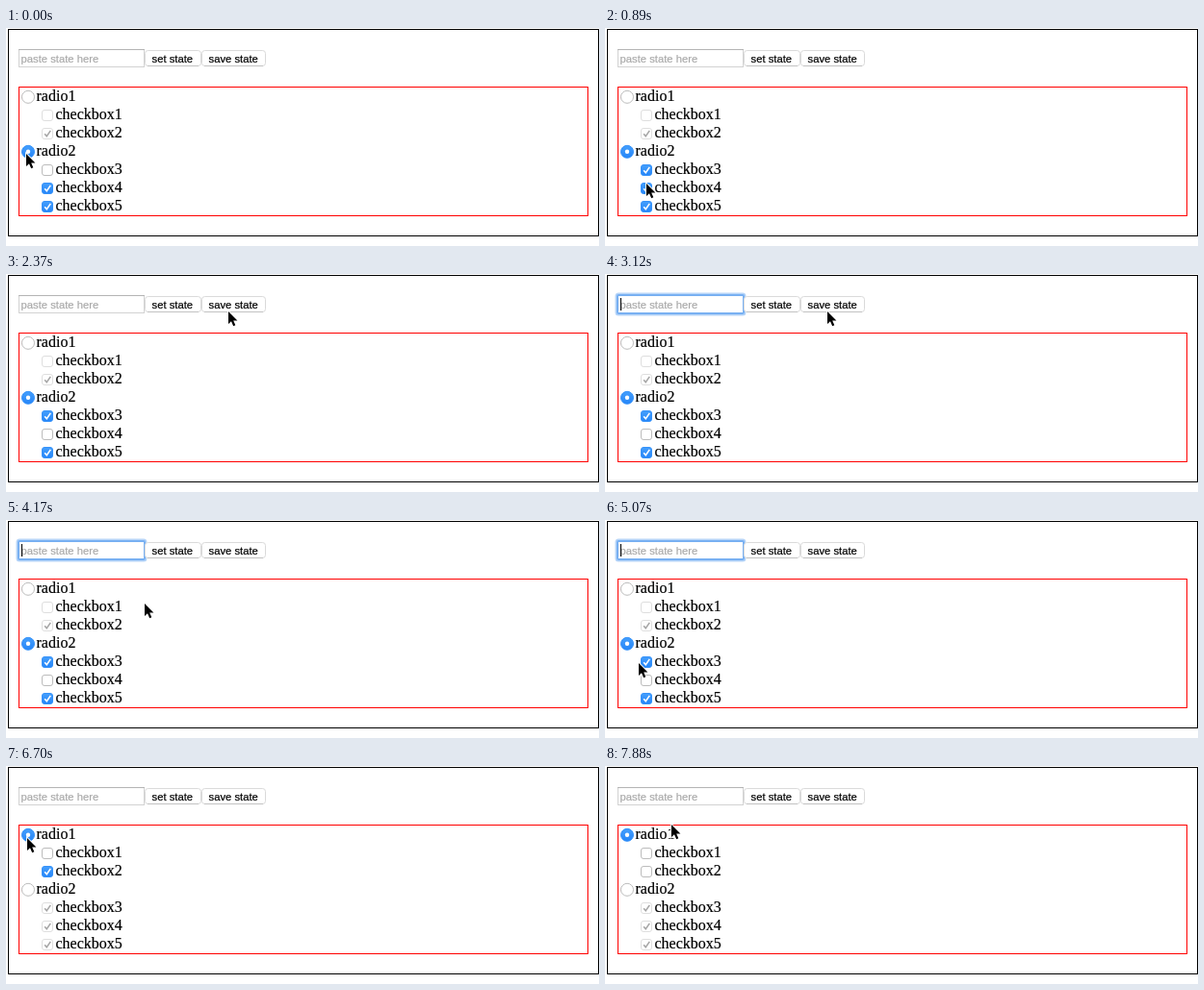
An HTML page for the animation above (8 s loop, 616 px wide and 227 px high).

```html
<!DOCTYPE html>
<html lang="en">
<head>
<meta charset="utf-8">
<title>Form state</title>
<style>
  html, body { margin: 0; width: 100%; height: 100%; overflow: hidden; background: #fff; }
  svg { display: block; width: 616px; height: 227px; }
  text { font: 16px "Liberation Serif", Times, serif; stroke: #000; stroke-width: .2; }
  .ui { font: 11.25px "Liberation Sans", Arial, sans-serif; }
  .hint { fill: #a9a9a9; stroke: #a9a9a9; }

  .button rect { fill: #fff; stroke: #dadada; }
  .button path { stroke: #c2c2c2; }
  .button.on rect { fill: url(#press); stroke: #3d8cf0; }
  .button.on path { stroke: #1d62d6; }
  .button.on text { fill: #fff; stroke: #fff; }

  .box { fill: #fff; stroke: #bcbcbc; }
  .mark { fill: none; stroke: #fff; stroke-width: 1.6; visibility: hidden; }
  .dot { fill: #fff; visibility: hidden; }
  .on .box { fill: url(#blue); stroke: #3592fa; }
  .on .mark, .on .dot { visibility: visible; }
  .disabled .box { fill: #fff; stroke: #dedede; }
  .disabled .mark { stroke: #a6a6a6; }

  #focus, #caret { visibility: hidden; }
  #focus.on, #caret.on { visibility: visible; }
</style>
</head>
<body>
<svg viewBox="0 0 616 227">
  <defs>
    <linearGradient id="blue" x2="0" y2="1">
      <stop stop-color="#459ffc"/><stop offset="1" stop-color="#2585f8"/>
    </linearGradient>
    <linearGradient id="press" x2="0" y2="1">
      <stop stop-color="#6cb3fa"/><stop offset="1" stop-color="#136fff"/>
    </linearGradient>
  </defs>

  <rect x="2.5" y="1.5" width="613" height="215" fill="none" stroke="#000"/>
  <rect x="13.5" y="61.5" width="591" height="134" fill="none" stroke="#f00"/>

  <rect x="13.5" y="22.5" width="130" height="18" fill="#fff" stroke="#d2d2d2"/>
  <path d="M13 22.5H144" stroke="#b4b4b4"/>
  <g id="focus" fill="none">
    <rect x="11.5" y="20.5" width="134" height="22" rx="2.5" stroke="#b5d4f8" stroke-width="2"/>
    <rect x="13" y="22" width="131" height="19" rx="1" stroke="#78b0f2" stroke-width="2"/>
  </g>
  <text class="ui hint" x="15.5" y="36">paste state here</text>
  <path id="caret" d="M16.5 25V38" stroke="#000"/>

  <g id="form"></g>

  <path id="cursor" d="M2 2V15L5 12.3L7.2 17.2L9.3 16.3L7.2 11.6H11.4Z"
        stroke="#fff" stroke-width="1.8" paint-order="stroke"/>
</svg>

<script>
const LOOP = 8000;
const TICK = 148.6; // the picture advances in ticks of this many ms
const $ = id => document.getElementById(id);

const button = (id, x, width, label) => `<g id="${id}" class="button">
  <rect x="${x + .5}" y="23.5" width="${width - 1}" height="16" rx="3"/>
  <path d="M${x + 3} 39.5H${x + width - 3}"/>
  <text class="ui" x="${x + 7.5}" y="36">${label}</text></g>`;

const radio = (id, y) => `<g id="${id}">
  <circle class="box" cx="23" cy="${y - 4.2}" r="6.5"/>
  <circle class="dot" cx="23" cy="${y - 4.2}" r="2.2"/>
  <text x="31.5" y="${y}">${id}</text></g>`;

const checkbox = (id, y) => `<g id="${id}">
  <rect class="box" x="37.5" y="${y - 9.5}" width="11" height="11" rx="2.5"/>
  <path class="mark" d="M40.2 ${y - 3.8}l2.1 2.5 4-5.8"/>
  <text x="51.5" y="${y}">${id}</text></g>`;

const isRadio = id => id.startsWith("radio");
const rows = ["radio1", "checkbox1", "checkbox2", "radio2", "checkbox3", "checkbox4", "checkbox5"];
$("form").innerHTML = button("set", 144, 59, "set state") + button("save", 203, 67, "save state") +
  rows.map((id, i) => (isRadio(id) ? radio : checkbox)(id, 76 + 19 * i)).join("");

const home = { x: 19, y: 129 };
const moves = [
  { from: 0, to: 2, x: 45, y: 151 },
  { from: 5, to: 8, x: 38, y: 167 },
  { from: 11, to: 13, x: 181, y: 118 },
  { from: 13, to: 16, x: 229, y: 37 },
  { from: 23, to: 30, x: 134, y: 89 },
  { from: 30, to: 34, x: 33, y: 147 },
  { from: 34, to: 37, x: 39, y: 165 },
  { from: 38, to: 42, x: 20, y: 73 },
  { from: 45, to: 49, x: 41, y: 108 },
  { from: 51, to: 53, x: 67, y: 59 }
];

const checkedAtStart = ["checkbox2", "radio2", "checkbox4", "checkbox5"];
const clicks = [
  { at: 4, id: "checkbox3" },
  { at: 10, id: "checkbox4" },
  { at: 38, id: "checkbox4" },
  { at: 44, id: "radio1" },
  { at: 50, id: "checkbox2" }
];
const press = 20, focus = 21, blur = 37, blink = 3.25;

const easeOut = p => 1 - (1 - p) ** 2;

function pointerAt(tick) {
  let { x, y } = home;
  for (const move of moves) {
    const p = easeOut(Math.min(1, Math.max(0, (tick - move.from) / (move.to - move.from))));
    x += (move.x - x) * p;
    y += (move.y - y) * p;
  }
  return [Math.round(x), Math.round(y)];
}

function checkedAt(tick) {
  const checked = new Set(checkedAtStart);
  for (const { at, id } of clicks) {
    if (at > tick) break;
    if (isRadio(id)) rows.filter(isRadio).forEach(other => checked.delete(other));
    if (!checked.delete(id)) checked.add(id);
  }
  return checked;
}

function draw(tick) {
  $("cursor").setAttribute("transform", `translate(${pointerAt(tick)})`);

  const checked = checkedAt(tick);
  let enabled;
  for (const id of rows) {
    if (isRadio(id)) enabled = checked.has(id);
    $(id).classList.toggle("on", checked.has(id));
    $(id).classList.toggle("disabled", !isRadio(id) && !enabled);
  }

  const focused = tick >= focus && tick < blur;
  const lit = Math.floor((tick - focus) / blink) % 2 === 0;
  $("save").classList.toggle("on", tick === press);
  $("focus").classList.toggle("on", focused);
  $("caret").classList.toggle("on", focused && lit);
}

const start = performance.now();
function frame() {
  const time = (performance.now() - start) % LOOP;
  draw(Math.floor((time + 20) / TICK));
  requestAnimationFrame(frame);
}
frame();
</script>
</body>
</html>
```
